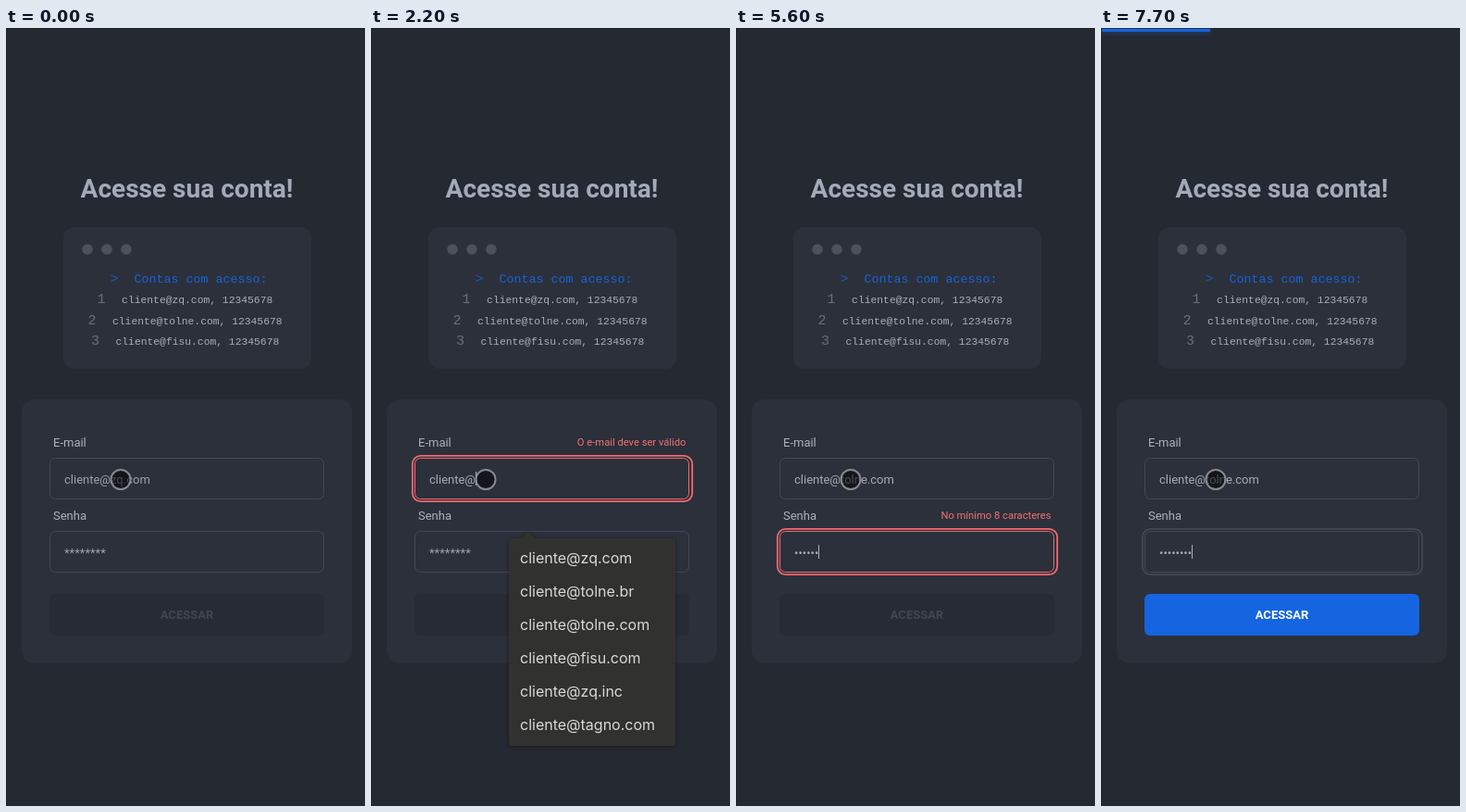
An HTML page for the animation above (8 s loop, 388 by 840 pixels).

```html
<!DOCTYPE html>
<html lang="pt-BR">
<head>
<meta charset="utf-8">
<title>Acesse sua conta</title>
<style>
  html, body { margin: 0; width: 100%; height: 100%; overflow: hidden; background: #252932; }
  svg { display: block; width: 388px; height: 840px; }
  text { white-space: pre; font: 13px Roboto, sans-serif; fill: #a7abb4; }
  .title { font-size: 28px; font-weight: 700; fill: #a3abb8; }
  .mono { font: 11.33px "Liberation Mono", monospace; fill: #a9afba; }
  .num { font: 15px "Liberation Mono", monospace; fill: #6a6f79; }
  .prompt { font: 13.33px "Liberation Mono", monospace; fill: #1a62d8; }
  .label { fill: #adb1ba; }
  .error { font-size: 11.2px; fill: #f3706f; }
  .button { font-weight: 700; }
  .item { font: 16px Inter, sans-serif; fill: #d9d9d7; }
  #popup { filter: drop-shadow(0 1px 2px rgba(0, 0, 0, .4)); }
  #bar { filter: drop-shadow(0 0 3px rgba(21, 101, 224, .7)); }
</style>
</head>
<body>
<svg id="stage" viewBox="0 0 388 840"></svg>
<script>
const LOOP = 8000;
const GREY = [67, 72, 83], RED = [240, 107, 109];
const OFF = [39, 43, 53], BLUE = [21, 101, 224];
const OFF_TEXT = [65, 70, 81], WHITE = [255, 255, 255];

const EMAIL = 'cliente@tolne.com';
const SAVED = ['cliente@zq.com', 'cliente@tolne.br', 'cliente@tolne.com',
  'cliente@fisu.com', 'cliente@zq.inc', 'client@zq.inc', 'cliente@tagno.com'];

// [time, characters typed]
const EMAIL_KEYS = [[900, 1], [1000, 2], [1200, 3], [1300, 4], [1400, 5], [1500, 6],
  [1700, 7], [2000, 8], [2400, 9], [2600, 11], [2900, 12], [3100, 13], [3200, 14],
  [3300, 15], [3400, 16], [3500, 17]];
const PASS_KEYS = [[4600, 1], [4700, 2], [4900, 3], [5100, 4], [5400, 5], [5600, 6],
  [5800, 7], [6000, 8]];
const LOADING = [8, 20, 35, 60, 75, 98, 110, 118];

const stage = document.getElementById('stage');

function add(tag, attrs, parent = stage) {
  const el = document.createElementNS('http://www.w3.org/2000/svg', tag);
  set(el, attrs);
  return parent.appendChild(el);
}
function set(el, attrs) {
  for (const key in attrs) el.setAttribute(key, attrs[key]);
}
function box(x, y, width, height, rx, fill, more, parent) {
  return add('rect', { x, y, width, height, rx, fill, ...more }, parent);
}
function write(x, y, str, cls = '', anchor = 'start', parent) {
  const el = add('text', { x, y, class: cls, 'text-anchor': anchor }, parent);
  el.textContent = str;
  return el;
}
const show = (el, on) => el.setAttribute('visibility', on ? 'visible' : 'hidden');
const mix = (a, b, k) => `rgb(${a.map((v, i) => Math.round(v + (b[i] - v) * k))})`;
const typed = (keys, t) => keys.reduce((n, [at, count]) => t >= at ? count : n, 0);

function fade(dt) {
  if (dt < 0) return 0;
  const p = Math.min(1, (dt + 60) / 240);
  return p * p * (3 - 2 * p);
}

// Page and terminal
box(0, 0, 388, 840, 0, '#252932');
box(0, 0, 388, 1, 0, '#202326');
box(0, 0, 1, 840, 0, '#202326');
write(195.5, 183, 'Acesse sua conta!', 'title', 'middle');
box(62, 215, 268, 153, 12, '#2b303b');
for (const cx of [88, 109, 130]) add('circle', { cx, cy: 239, r: 5.8, fill: '#4c515c' });
write(112.5, 275, '>', 'num').style.fill = '#2558a8';
write(138.5, 275, 'Contas com acesso:', 'prompt');
[[0, 125.1, 297], [2, 115, 320], [3, 118.5, 342]].forEach(([id, x, y], i) => {
  write(x - 26.6, y, i + 1, 'num');
  write(x, y, SAVED[id] + ', 12345678', 'mono');
});

// Form
box(17, 401, 357, 285, 14, '#2b303b');

function makeField(y, label, hint, message) {
  write(51, y - 12, label, 'label');
  const error = write(340.5, y - 13, message, 'error', 'end');
  const ring = box(44.8, y - 2.2, 302.4, 49.4, 9, 'none', { 'stroke-width': 1.8 });
  const frame = box(47.5, y + .5, 296, 44, 6, 'none', { 'stroke-width': 1 });
  const text = write(63, y + 28, '');
  const caret = box(63, y + 15, 1, 15, 0, '#adb1ba');
  return (value, focus, invalid, redness) => {
    show(error, invalid);
    show(ring, focus);
    show(caret, focus);
    ring.setAttribute('stroke', invalid ? mix(RED, RED, 0) : mix(GREY, GREY, 0));
    frame.setAttribute('stroke', mix(GREY, RED, redness));
    text.textContent = value || hint;
    text.style.fill = value ? '#a7abb4' : '#9ca1ab';
    const width = value ? text.getComputedTextLength() : 0;
    caret.setAttribute('x', Math.round(63 + width));
  };
}
const drawEmail = makeField(464, 'E-mail', SAVED[0], 'O e-mail deve ser válido');
const drawPass = makeField(543, 'Senha', '********', 'No mínimo 8 caracteres');

const button = box(47, 611, 297, 45, 6, '');
const buttonText = write(195.5, 638, 'ACESSAR', 'button', 'middle');

// Suggestions
const popup = add('g', { id: 'popup' });
add('path', { d: 'M161 552L170 544L179 552Z', fill: '#313130' }, popup);
const panel = box(149, 551, 180, 44, 3, '#313130', {}, popup);
const items = [0, 1, 2, 3, 4, 5].map(i => write(161, 578 + 36 * i, '', 'item', 'start', popup));

function drawPopup(t, value) {
  const open = t >= 500 && t < 3700 && value !== EMAIL;
  popup.style.display = open ? '' : 'none';
  const list = SAVED.filter(s => s.startsWith(value)).slice(0, value ? 6 : 3);
  set(panel, { width: value ? 180 : 228, height: 8 + 36 * list.length });
  items.forEach((el, i) => el.textContent = list[i] || '');
}

// Pointer and loading bar
add('circle', { cx: 124, cy: 487.5, r: 10.5, fill: 'rgba(0,0,0,.55)',
  stroke: 'rgba(150,154,162,.85)', 'stroke-width': 2 });
const bar = box(1, 1, 0, 3, 0, '#1565e0', { id: 'bar' });

function draw(t) {
  const email = EMAIL.slice(0, typed(EMAIL_KEYS, t));
  const bullets = '•'.repeat(typed(PASS_KEYS, t));
  drawEmail(email, t >= 200 && t < 3700, t >= 900 && t < 3300, fade(t - 900) - fade(t - 3300));
  drawPass(bullets, t >= 3700, t >= 4600 && t < 6000, fade(t - 4600) - fade(t - 6000));
  drawPopup(t, email);

  const ready = fade(t - 6000);
  button.setAttribute('fill', mix(OFF, BLUE, ready));
  buttonText.style.fill = mix(OFF_TEXT, WHITE, ready);

  const step = Math.min(7, Math.floor((t - 7000) / 100));
  show(bar, step >= 0);
  bar.setAttribute('width', step >= 0 ? LOADING[step] - 1 : 0);
}

const start = performance.now();
function tick() {
  const t = (performance.now() - start) % LOOP;
  draw(Math.floor(t / 100) * 100);
  requestAnimationFrame(tick);
}
tick();
</script>
</body>
</html>
```
